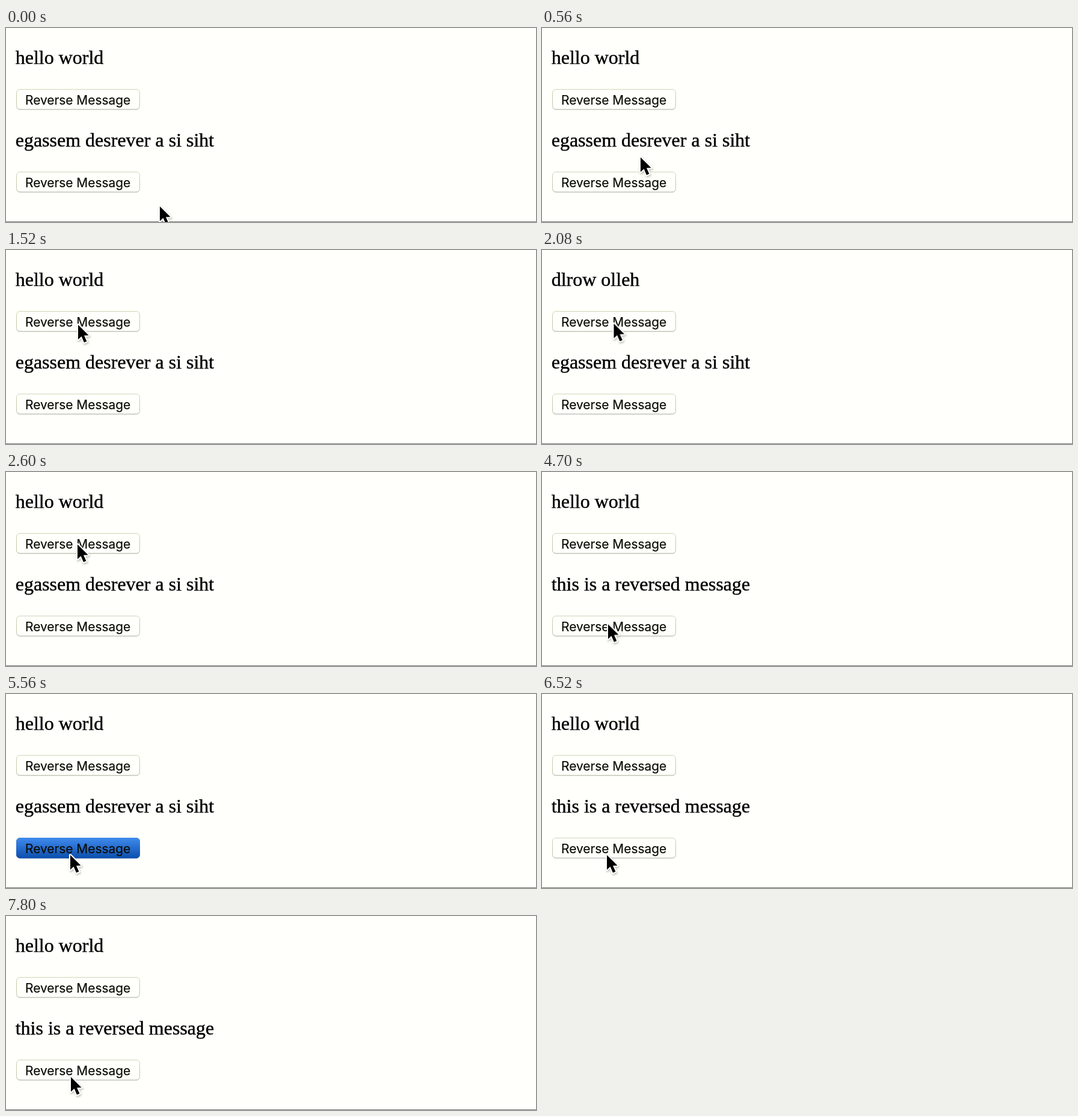
Write an HTML page that moves like this. It is 882 by 324 pixels and loops after 7820 ms.

```html
<!DOCTYPE html>
<html lang="en">
<head>
<meta charset="utf-8">
<title>Reverse Message</title>
<style>
  html, body { margin: 0; width: 100%; height: 100%; overflow: hidden; background: #fffffb; }
  svg { display: block; width: 882px; height: 324px; }
  .msg { font: 32px "Liberation Serif", "Times New Roman", serif; stroke: #000; stroke-width: .45px; }
  .label { font: 20.9px Inter, Roboto, sans-serif; fill: #0b0b04; stroke: #0b0b04; stroke-width: .2px; }

  /* 1% = 78.2 ms; state changes are hard cuts */
  .hello, .dlrow, .egassem, .this, .press1, .press2 { animation: 7820ms step-end infinite; }
  .hello { animation-name: hello; }
  .dlrow { animation-name: dlrow; }
  .egassem { animation-name: egassem; }
  .this { animation-name: this; }
  .press1 { animation-name: press1; }
  .press2 { animation-name: press2; }
  .cursor { animation: move 7820ms linear infinite; }

  @keyframes hello { 0%, 30.95%, 100% { opacity: 1 } 22.76% { opacity: 0 } }
  @keyframes dlrow { 0%, 30.95%, 100% { opacity: 0 } 22.76% { opacity: 1 } }
  @keyframes egassem { 0%, 64.71% { opacity: 1 } 57.03%, 72.38%, 100% { opacity: 0 } }
  @keyframes this { 0%, 64.71% { opacity: 0 } 57.03%, 72.38%, 100% { opacity: 1 } }
  @keyframes press1 {
    0%, 22.76%, 30.95%, 100% { opacity: 0 }
    21.23%, 29.41% { opacity: 1 }
  }
  @keyframes press2 {
    0%, 57.03%, 64.71%, 72.38%, 100% { opacity: 0 }
    55.5%, 63.17%, 70.84% { opacity: 1 }
  }
  @keyframes move {
    0%, 1.28% { transform: translate(256px, 298px) }
    7.16%, 8.44% { transform: translate(164px, 216px) }
    10.74%, 12.02% { transform: translate(135px, 168px) }
    16.37% { transform: translate(120px, 126px) }
    19.44% { transform: translate(120px, 125px) }
    33.25%, 38.62% { transform: translate(119px, 121px) }
    47.83%, 49.1% { transform: translate(115px, 166px) }
    52.69% { transform: translate(110px, 251px) }
    59.85% { transform: translate(110px, 254px) }
    69.05%, 72.38% { transform: translate(107px, 269px) }
    81.33%, 100% { transform: translate(108px, 269px) }
  }
</style>
</head>
<body>
<svg viewBox="0 0 882 324">
  <defs>
    <linearGradient id="edge" x2="0" y2="1">
      <stop stop-color="#d4d4b8"/>
      <stop offset=".85" stop-color="#c2c2a6"/>
      <stop offset="1" stop-color="#a3a396"/>
    </linearGradient>
    <linearGradient id="blue" x2="0" y2="1">
      <stop stop-color="#3f8aec"/>
      <stop offset="1" stop-color="#0c4fae"/>
    </linearGradient>
    <filter id="glow" x="-60%" y="-40%" width="220%" height="190%">
      <feDropShadow dx="1" dy="2" stdDeviation="1.8" flood-color="#80806a" flood-opacity=".5"/>
    </filter>
    <rect id="box" x="17.5" y="102.5" width="205" height="33.5" rx="5.5"/>
    <path id="arrow" d="M0 0V24.5L5.6 19.3L10 29.4L14.4 27.6L10 17.7L17.6 17.5Z"/>
  </defs>

  <text class="msg hello" x="15.7" y="60">hello world</text>
  <text class="msg dlrow" x="15.7" y="60">dlrow olleh</text>
  <use href="#box" fill="#fffffb" stroke="url(#edge)"/>
  <use class="press1" href="#box" fill="url(#blue)" stroke="url(#blue)"/>
  <text class="label" x="32" y="128">Reverse Message</text>

  <text class="msg egassem" x="15.7" y="198">egassem desrever a si siht</text>
  <text class="msg this" x="15.7" y="198">this is a reversed message</text>
  <g transform="translate(0 138)">
    <use href="#box" fill="#fffffb" stroke="url(#edge)"/>
    <use class="press2" href="#box" fill="url(#blue)" stroke="url(#blue)"/>
    <text class="label" x="32" y="128">Reverse Message</text>
  </g>

  <rect y="323" width="882" height="1" fill="#777770"/>
  <g class="cursor">
    <use href="#arrow" fill="#fff" stroke="#fff" stroke-width="4" stroke-linejoin="round" filter="url(#glow)"/>
    <use href="#arrow"/>
  </g>
</svg>
</body>
</html>
```
